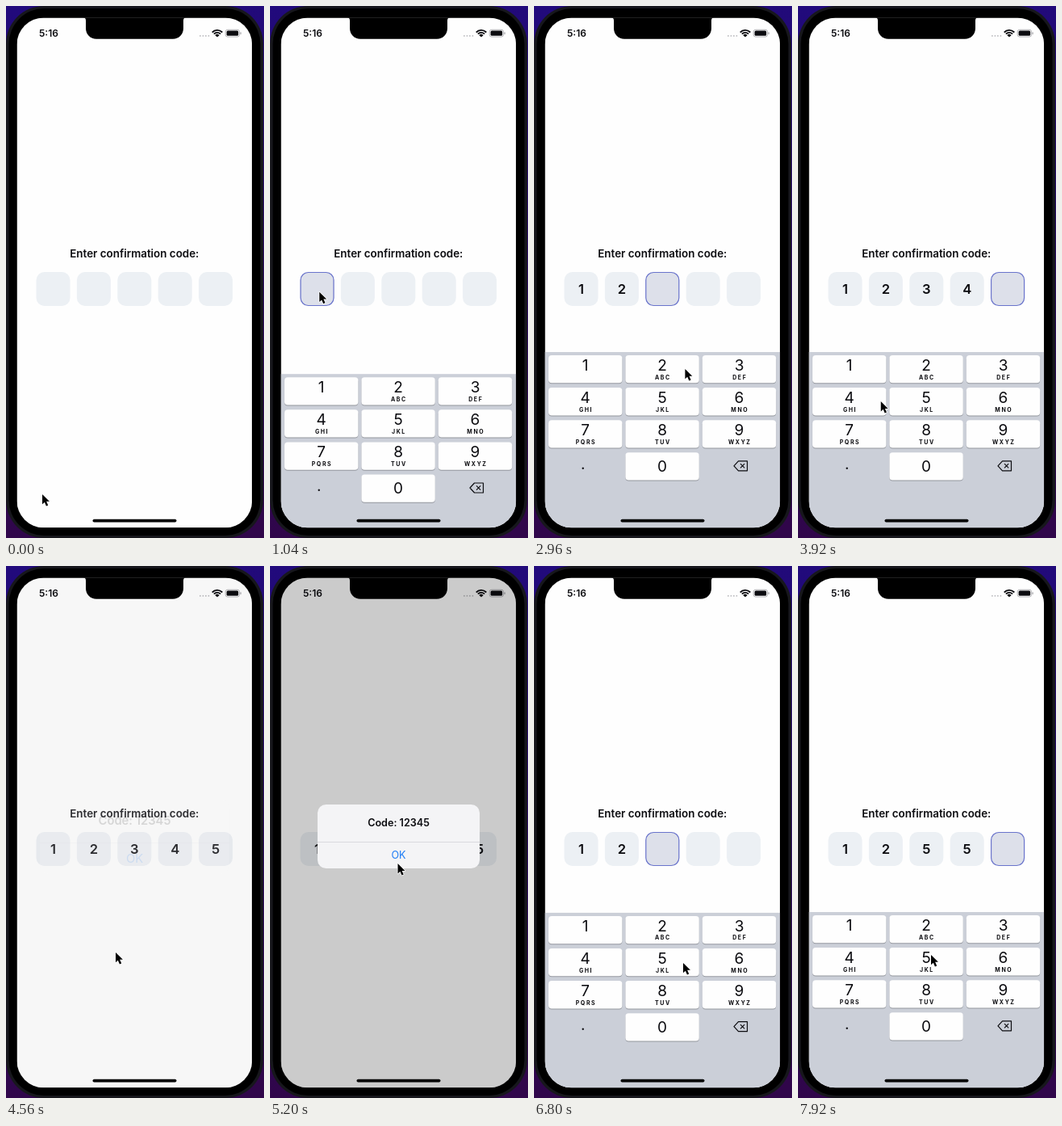
These frames come from a looping animation (320 px wide and 658 px high, 8 s). An HTML page with a canvas:

```html
<!DOCTYPE html>
<html lang="en">
<head>
<meta charset="utf-8">
<title>Confirmation code</title>
<style>
  html, body { margin: 0; width: 100%; height: 100%; overflow: hidden; background: #000; }
  canvas { display: block; width: 100vw; height: 100vh; }
</style>
</head>
<body>
<canvas id="stage"></canvas>
<script>
const W = 320, H = 658, LOOP = 8000;
const FONT = 'Inter, Roboto, sans-serif';
const PAPER = '#fefefe', INK = '#0c0c10';
const SCREEN = { x: 13.5, y: 14.5, w: 291.7, h: 630.7 };
const KEYS_TOP = 428, KEYS_HEIGHT = 230;
const LETTERS = ['', 'ABC', 'DEF', 'GHI', 'JKL', 'MNO', 'PQRS', 'TUV', 'WXYZ'];

const canvas = document.getElementById('stage');
const ctx = canvas.getContext('2d');
const ratio = window.devicePixelRatio || 1;
canvas.width = W * ratio;
canvas.height = H * ratio;

// Layout
const keyX = i => 18 + (i % 3) * 95.4;
const keyY = i => 4 + Math.floor(i / 3) * 40.1;
const boxX = i => 37.5 + i * 50.4;
const keyCentre = digit => [keyX(digit - 1) + 42, KEYS_TOP + keyY(digit - 1) + 17];

// The pointer's route; a step may carry out an action on arrival
const route = [];
const go = (time, [x, y], action = {}) => route.push({ time, x, y, ...action });

go(0, [45, 604]);
go(840, [boxX(0) + 23, 352], { focus: 0 });
go(1840, [123, 493]);
for (let n = 1; n <= 5; n++) go(1770 + n * 470, keyCentre(n), { digit: n });
go(4560, [136, 478]);
go(5380, [161, 356], { confirm: true });
go(5680, [165, 348]);
go(6380, [165, 348], { focus: 2 });
go(6800, [185, 491]);
for (let n = 0; n < 2; n++) go(7200 + n * 400, [165, 481], { digit: 5 });

// Replays the actions up to time t
function stateAt(t) {
  const s = { code: '', focus: -1, keysSince: -LOOP, alertSince: -LOOP, alert: false };
  for (const { time, focus, digit, confirm } of route) {
    if (time > t) break;
    if (focus !== undefined) {
      s.code = s.code.slice(0, focus);
      s.focus = focus;
      s.keysSince = time;
    }
    if (digit) {
      s.code += digit;
      s.focus = s.code.length;
      if (s.focus === 5) {
        s.focus = -1;
        s.keysSince = time;
        s.alertSince = time + 390;
        s.alert = true;
      }
    }
    if (confirm) {
      s.alert = false;
      s.alertSince = time;
    }
  }
  return s;
}

const spring = (ms, rate) => {
  const k = Math.max(0, ms) * rate / 1000;
  return 1 - Math.exp(-k) * (1 + k);
};
const toggled = (on, ms, rate) => on ? spring(ms, rate) : 1 - spring(ms, rate);

const rounded = (x, y, w, h, r) => {
  ctx.beginPath();
  ctx.roundRect(x, y, w, h, r);
};

const fillBox = (x, y, w, h, r, color) => {
  ctx.fillStyle = color;
  rounded(x, y, w, h, r);
  ctx.fill();
};

const strokeBox = (x, y, w, h, r, color, width) => {
  ctx.strokeStyle = color;
  ctx.lineWidth = width;
  rounded(x, y, w, h, r);
  ctx.stroke();
};

const poly = points => {
  ctx.beginPath();
  points.forEach(([x, y]) => ctx.lineTo(x, y));
  ctx.closePath();
};

const label = (text, x, y, size, weight, color = INK, spacing = 0, align = 'center') => {
  ctx.font = `${weight} ${size}px ${FONT}`;
  ctx.textAlign = align;
  ctx.letterSpacing = spacing + 'px';
  ctx.fillStyle = color;
  ctx.fillText(text, x, y);
  ctx.letterSpacing = '0px';
};

function drawPhone() {
  const back = ctx.createLinearGradient(0, 0, 60, H);
  back.addColorStop(0, '#210a7c');
  back.addColorStop(1, '#30064a');
  ctx.fillStyle = back;
  ctx.fillRect(0, 0, W, H);
  fillBox(0, 0, 319, H, 47, '#17171c');
  fillBox(3.5, 3, 312, 652, 44, '#000');
}

function drawNotch() {
  ctx.fillStyle = '#000';
  ctx.beginPath();
  ctx.moveTo(95, 14);
  ctx.arcTo(99, 14, 99, 20, 4);
  ctx.arcTo(99, 40.8, 115, 40.8, 13);
  ctx.arcTo(220, 40.8, 220, 20, 13);
  ctx.arcTo(220, 14, 224, 14, 4);
  ctx.lineTo(224, 14);
  ctx.fill();
}

function drawStatus() {
  label('5:16', 41, 38, 12, 600, INK, 0, 'left');
  for (let i = 0; i < 4; i++) fillBox(240 + i * 3.5, 36, 1.8, 1.8, 0.9, '#b8b8bc');

  // Wi-Fi: a solid wedge under two arcs
  const from = -Math.PI * 0.76, to = -Math.PI * 0.24;
  ctx.strokeStyle = ctx.fillStyle = INK;
  ctx.lineWidth = 1.9;
  for (const r of [5.6, 8.6]) {
    ctx.beginPath();
    ctx.arc(262, 38.5, r, from, to);
    ctx.stroke();
  }
  ctx.beginPath();
  ctx.moveTo(262, 38.6);
  ctx.arc(262, 38.6, 3.6, from, to);
  ctx.fill();

  strokeBox(272.2, 29.3, 17.4, 8.8, 2.6, '#a4a4a8', 0.8);
  fillBox(273.6, 30.6, 14.6, 6.2, 1.5, INK);
  fillBox(290.5, 32.2, 1.2, 3, 0.6, '#a4a4a8');
}

function drawForm({ code, focus }) {
  label('Enter confirmation code:', 159.3, 311, 13.4, 600);
  for (let i = 0; i < 5; i++) {
    const x = boxX(i), active = i === focus;
    fillBox(x, 329, 42, 42, 10, active ? '#dde0ea' : '#ecf0f4');
    if (active) strokeBox(x + 0.5, 329.5, 41, 41, 9.5, '#6a74cc', 1.2);
    if (code[i]) label(code[i], x + 21, 356, 16.6, 600);
  }
}

function drawDelete(x, y) {
  ctx.strokeStyle = INK;
  ctx.lineWidth = 1.2;
  ctx.lineJoin = 'round';
  poly([[x - 8.5, y], [x - 3, y - 6], [x + 8, y - 6], [x + 8, y + 6], [x - 3, y + 6]]);
  ctx.stroke();
  ctx.beginPath();
  for (const s of [-1, 1]) {
    ctx.moveTo(x - 0.5, y - 2.6 * s);
    ctx.lineTo(x + 4.7, y + 2.6 * s);
  }
  ctx.stroke();
}

function drawKey(i, digit, letters, baseline) {
  const x = keyX(i), y = keyY(i), mid = x + 45.7;
  fillBox(x, y + 1, 91.4, 34.3, 4, '#94979e');
  fillBox(x, y, 91.4, 34.3, 4, PAPER);
  label(digit, mid, y + baseline, 19, 400);
  label(letters, mid + 0.8, y + 29.5, 7, 700, INK, 1.6);
}

function drawKeyboard(open) {
  ctx.save();
  ctx.translate(0, KEYS_TOP + KEYS_HEIGHT * (1 - open));
  ctx.fillStyle = '#cbcfd8';
  ctx.fillRect(SCREEN.x, 0, SCREEN.w, KEYS_HEIGHT);
  LETTERS.forEach((letters, i) => drawKey(i, i + 1, letters, 19));
  drawKey(10, 0, '', 23.6);
  label('.', 60.7, keyY(9) + 21, 19, 400);
  drawDelete(256.5, keyY(11) + 16.5);
  ctx.restore();
}

function drawAlert(shown, entering) {
  if (shown < 0.004) return;
  ctx.fillStyle = `rgba(0, 0, 0, ${0.2 * shown})`;
  ctx.fillRect(SCREEN.x, SCREEN.y, SCREEN.w, SCREEN.h);

  const zoom = entering ? 1.2 - 0.2 * shown : 1;
  ctx.save();
  ctx.globalAlpha = shown;
  ctx.translate(159.5, 334.5);
  ctx.scale(zoom, zoom);
  fillBox(-100.5, -39.5, 201, 79, 10.5, '#f4f4f6');
  ctx.fillStyle = '#cfcfd4';
  ctx.fillRect(-100.5, 6.5, 201, 0.7);
  label('Code: 12345', 0, -12, 12.6, 600);
  label('OK', 0, 27.5, 12.6, 400, '#1c7cf6');
  ctx.restore();
}

function drawPointer(t) {
  const i = route.findLastIndex(p => p.time <= t);
  const a = route[i], b = route[i + 1] || a;
  const leave = a.time + 150, arrive = b.time - 60;
  const u = Math.min(1, Math.max(0, (t - leave) / Math.max(1, arrive - leave)));
  const e = u * u * (3 - 2 * u);
  ctx.save();
  ctx.translate(a.x + (b.x - a.x) * e, a.y + (b.y - a.y) * e);
  ctx.scale(0.95, 0.95);
  poly([[0, 0], [0, 13], [3, 10.2], [5.2, 15.2], [7.6, 14.1], [5.4, 9.3], [9.4, 9.3]]);
  ctx.lineJoin = 'round';
  ctx.lineWidth = 1.6;
  ctx.strokeStyle = '#fff';
  ctx.stroke();
  ctx.fillStyle = '#000';
  ctx.fill();
  ctx.restore();
}

function draw(t) {
  const s = stateAt(t);
  ctx.setTransform(ratio, 0, 0, ratio, 0, 0);
  drawPhone();
  ctx.save();
  rounded(SCREEN.x, SCREEN.y, SCREEN.w, SCREEN.h, 33);
  ctx.clip();
  ctx.fillStyle = PAPER;
  ctx.fillRect(SCREEN.x, SCREEN.y, SCREEN.w, SCREEN.h);
  drawForm(s);
  drawKeyboard(toggled(s.focus >= 0, t - s.keysSince, 18.3));
  drawStatus();
  drawAlert(toggled(s.alert, t - s.alertSince, 13), s.alert);
  drawNotch();
  fillBox(107.5, 634.7, 104, 3.8, 1.9, '#000');
  ctx.restore();
  drawPointer(t);
}

const start = performance.now();
function tick() {
  draw((performance.now() - start) % LOOP);
  requestAnimationFrame(tick);
}
tick();
</script>
</body>
</html>
```
